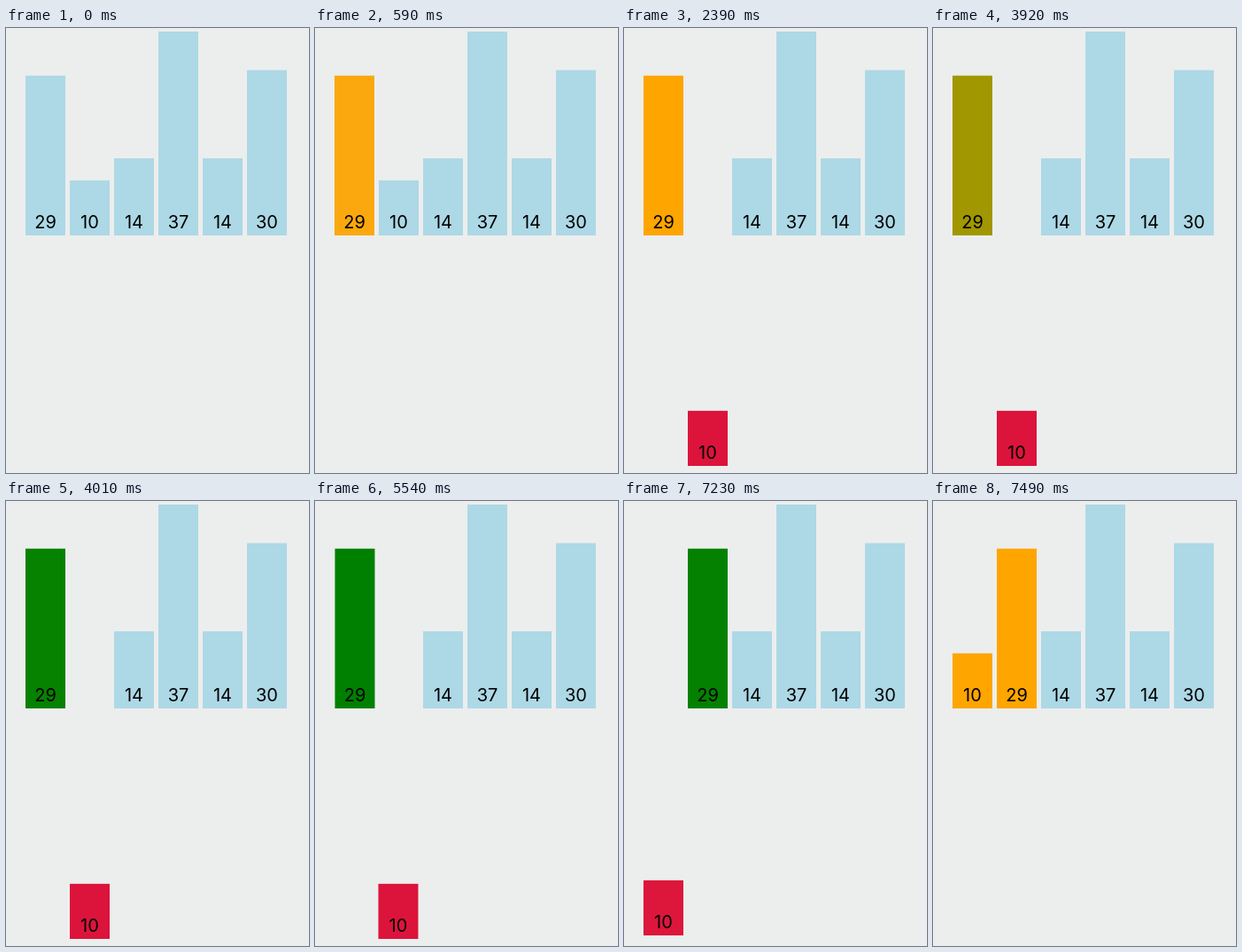
An HTML page for the animation above (8000 ms loop, 342 px wide and 502 px high).

```html
<!DOCTYPE html>
<html lang="en">
<head>
<meta charset="utf-8">
<title>Insertion sort bars</title>
<style>
  html, body { margin: 0; width: 100%; height: 100%; overflow: hidden; background: #eceeed; }
  svg { display: block; width: 342px; height: 502px; }
  text { font: 20px Inter, Roboto, sans-serif; text-anchor: middle; }
</style>
</head>
<body>
<svg id="stage" viewBox="0 0 342 502"></svg>
<script>
const LOOP = 8000, DURATION = 250;
const BASE = 234, WIDTH = 45, PITCH = 50, LEFT = 22, DROP = 260;
const UNIT = 230 / 37;
const BLUE = [173, 216, 230], ORANGE = [255, 165, 0], GREEN = [0, 128, 0], CRIMSON = [220, 20, 60];

// The picture only refreshes at these moments.
const TICKS = [0, 500, 590, 2120, 2210, 2300, 2390, 3920, 4010,
  5540, 5620, 5710, 5790, 7230, 7320, 7400, 7490];

// Start times of the transitions.
const SELECT = 400, LIFT = 2090, COMPARE = 3807, SWAP = 5506, SETTLE = 7191;

const stage = document.getElementById('stage');

function add(parent, tag, attrs) {
  const node = document.createElementNS('http://www.w3.org/2000/svg', tag);
  for (const key in attrs) node.setAttribute(key, attrs[key]);
  return parent.appendChild(node);
}

const bars = [29, 10, 14, 37, 14, 30].map((value, slot) => {
  const group = add(stage, 'g');
  const height = value * UNIT;
  const rect = add(group, 'rect', { y: BASE - height, width: WIDTH, height });
  add(group, 'text', { x: WIDTH / 2, y: BASE - 8 }).textContent = value;
  const bar = { group, rect };
  place(bar, slot, 0, BLUE);
  return bar;
});

function place({ group, rect }, slot, drop, color) {
  group.setAttribute('transform', `translate(${LEFT + PITCH * slot} ${DROP * drop})`);
  rect.setAttribute('fill', `rgb(${color.map(Math.round)})`);
}

function progress(time, start) {
  const t = Math.min(1, Math.max(0, (time - start) / DURATION));
  return t < 0.5 ? 4 * t ** 3 : 1 - 4 * (1 - t) ** 3;
}

const mix = (from, to, k) => from.map((c, i) => c + (to[i] - c) * k);

function draw(now) {
  const clock = now % LOOP;
  const time = TICKS.findLast(tick => tick <= clock);
  const [select, lift, compare, swap, settle] =
    [SELECT, LIFT, COMPARE, SWAP, SETTLE].map(start => progress(time, start));

  const larger = mix(mix(BLUE, ORANGE, select), GREEN, compare);
  const smaller = mix(BLUE, CRIMSON, lift);
  place(bars[0], swap, 0, mix(larger, ORANGE, settle));
  place(bars[1], 1 - swap, lift - settle, mix(smaller, ORANGE, settle));
}

const origin = performance.now();
function frame() {
  draw(performance.now() - origin);
  requestAnimationFrame(frame);
}
frame();
</script>
</body>
</html>
```
